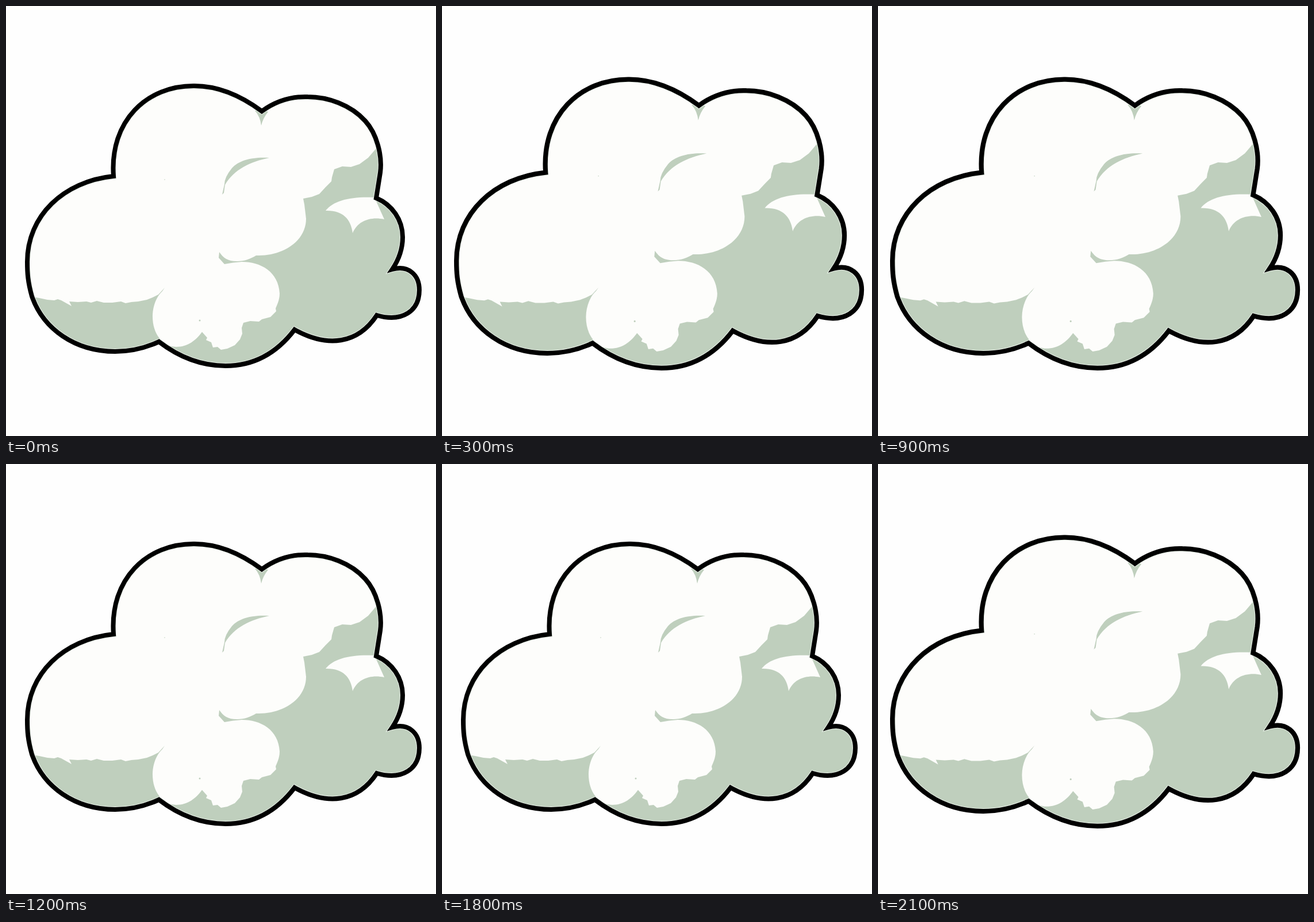
An HTML page that plays this animation: 748 by 748 pixels, repeating every 2.4 s.

```html
<!DOCTYPE html>
<html lang="en">
<head>
<meta charset="utf-8">
<title>Puffing cloud</title>
<style>
  html, body { margin: 0; width: 100%; height: 100%; overflow: hidden; background: #fefefe; }
  svg { display: block; width: 100%; height: 100%; }
  .light { fill: #fdfdfb; }
  .shade { fill: #bfcfbd; }
  .rim { fill: none; stroke: #e6eee5; stroke-width: 10; }
  .ink { fill: none; stroke: #000; stroke-width: 8; }
</style>
</head>
<body>
<svg viewBox="0 0 748 748">
  <defs>
    <path id="outline" d="M187 296C180 200 245 138 328 139C370 139 410 157 445 183
      C470 165 497 157 525 158C560 158 600 172 625 200C645 222 655 260 651 290L644 334
      C672 346 690 372 690 402C690 422 684 440 672 458C700 450 719 468 719 494
      C719 530 690 551 645 538C612 588 560 595 502 563C470 605 430 626 382 626
      C340 626 300 610 266 584C240 596 215 601 190 601C120 601 65 562 45 505
      C38 480 37 465 37 445C37 365 100 305 187 296Z"/>
    <clipPath id="inside"><use href="#outline"/></clipPath>
  </defs>
  <g id="cloud">
    <g clip-path="url(#inside)">
      <use href="#outline" class="shade"/>
      <!-- lit body with its ragged lower edge -->
      <path class="light" d="M0 0V505H40L58 508 72 511 84 512 90 510 96 512 114 522 110 514 125 515
        140 514 148 516 158 513 170 516 185 516 200 514 208 517 218 515 230 514 245 511
        255 507 265 502 276 490 272 496C262 505 255 522 255 540C255 570 272 592 296 593
        C316 593 330 582 341 567L350 577 348 581 357 585 360 594 368 593 374 598 385 596
        398 590 407 580 411 570 410 560 413 551 425 548 440 549 445 545 460 541 470 531
        469 526C474 515 476 508 476 500C474 462 443 445 410 445Q395 446 380 449L370 438
        371 428C378 438 385 444 402 444C415 444 425 440 435 434C480 436 522 410 522 370
        L519 345 517 335 532 332 545 327 556 315 566 305 567 298 571 284 585 279 600 280
        615 275 630 264 642 250 650 238 700 0Z"/>
      <path class="light" d="M556 356C570 338 600 331 641 333L658 371C635 366 612 373 603 395
        C600 370 585 355 556 356Z"/>
      <path class="shade" d="M433 182Q442 192 444 208Q447 195 456 184L445 180Z"/>
      <path class="shade" d="M458 264C430 262 405 268 393 282Q380 298 380 310L376 328 379 325 381 311
        C397 284 425 271 458 264Z"/>
      <circle class="shade" cx="337" cy="547" r="1.5"/>
      <circle class="shade" cx="276" cy="302" r=".8"/>
      <use href="#outline" class="rim"/>
    </g>
    <use href="#outline" class="ink"/>
  </g>
</svg>
<script>
  const cloud = document.getElementById("cloud");
  const start = performance.now();
  const step = 300;
  const poses = ["matrix(1 0 0 1 0 0)", "matrix(1.0335 0 0 1.0313 -13.1 -15.7)"];

  function draw() {
    const beat = Math.floor((performance.now() - start) / step);
    cloud.setAttribute("transform", poses[beat % poses.length]);
    requestAnimationFrame(draw);
  }
  draw();
</script>
</body>
</html>
```
